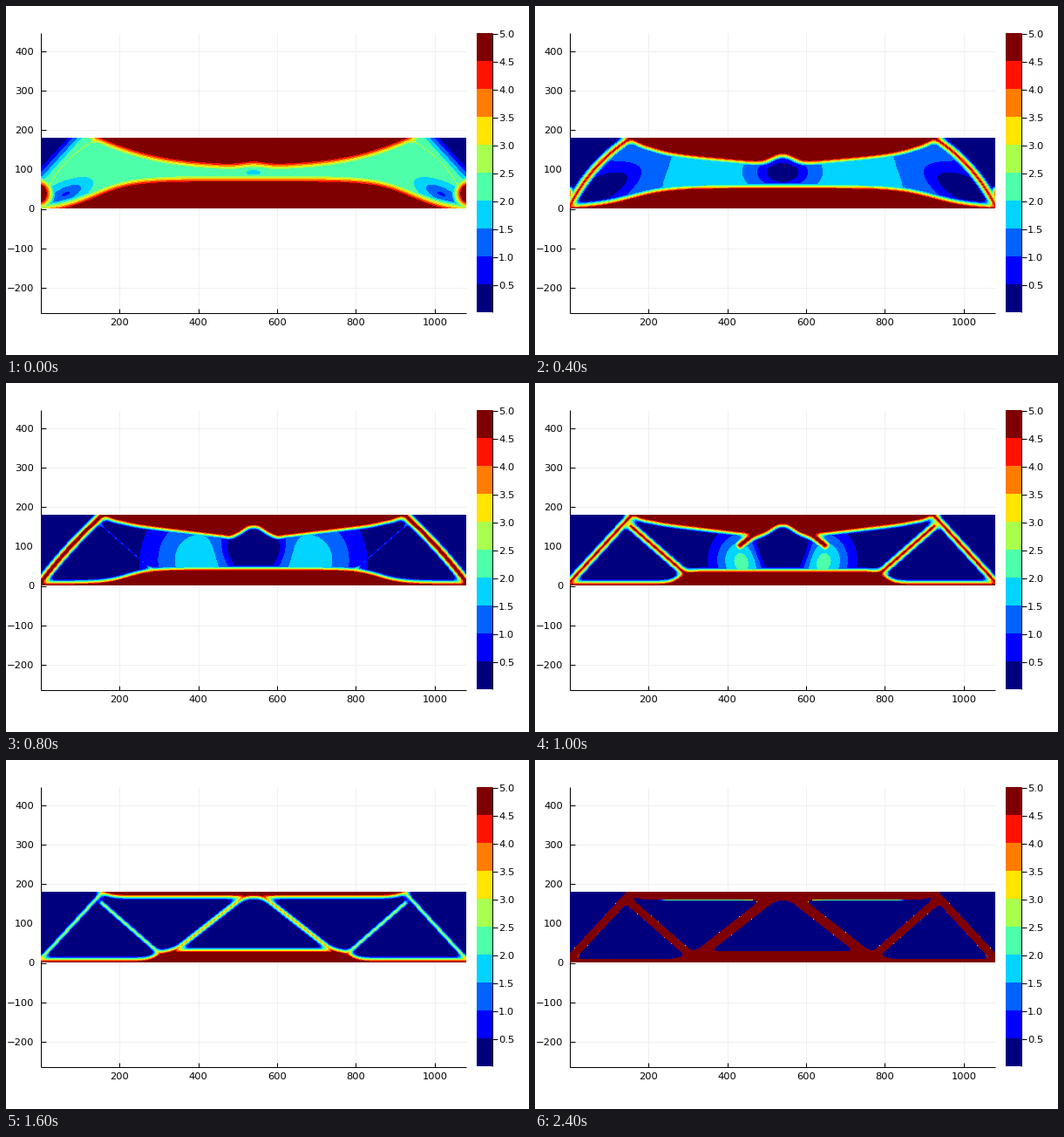
Write a matplotlib script that moves like this. It is 600 px wide and 400 px high and loops after 2.5 s.

```python
import numpy as np
import matplotlib as mpl
import matplotlib.pyplot as plt
from matplotlib.animation import FuncAnimation

W, H, DPI = 600, 400, 100
FRAMES, INTERVAL = 25, 100
LEFT, RIGHT, TOP, BOTTOM = 40, 528, 151, 232
MID = (LEFT + RIGHT) / 2
SCALE = (RIGHT - LEFT) / 1080
FONT = dict(family="DejaVu Sans", fontsize=11.5 * 72 / DPI, color="black")

# Joints of the truss in the left half, in stage pixels
SUPPORT, SHOULDER = (41, 227), (112, 150)
KNEE, FOOT = (110, 164), (180, 225)
CROWN, HEEL = (276, 154), (184, 226)

X, Y = np.meshgrid(np.arange(LEFT, MID) + .5, np.arange(TOP, BOTTOM) + .5)


def ramp(n, times, values):
    return np.interp(n, times, values)


def bell(u, v=0):
    return np.exp(-(u * u + v * v) / 2)


def across(p, q):
    """Position along the line p-q (0 to 1), offset from it, its length."""
    dx, dy = np.subtract(q, p)
    length = np.hypot(dx, dy)
    px, py = X - p[0], Y - p[1]
    return (px * dx + py * dy) / length ** 2, (px * dy - py * dx) / length, length


def strut(p, q, half, bow=0, reach=1):
    """Depth inside a bar from p to q; it may be bowed or partly grown."""
    t, v, length = across(p, q)
    u = np.clip(t, 0, reach)
    return half - np.hypot(v - 4 * bow * u * (1 - u), (t - u) * length)


def chord(edge, rest):
    """Depth behind a curved edge, corrected for its slope."""
    return (edge - rest) / np.hypot(1, np.gradient(edge, axis=1))


def join(a, b, r=6):
    """Union with rounded inner corners."""
    h = np.maximum(r - np.abs(a - b), 0)
    return np.maximum(a, b) + h * h / (4 * r)


def top_chord(n):
    d = MID - X
    flat = ramp(n, [0, 6, 12, 16, 24], [33, 13, 9, 6.5, 9.5])
    swell = ramp(n, [0, 6, 10, 12], [4, 18, 18, 0])
    span = ramp(n, [0, 6], [190, 175])
    edge = flat * (1 - (d / span) ** (3 + n))
    edge += swell * (np.maximum(1 - d / 150, 0) - .85 * bell(d / 12))
    return chord(edge, Y - TOP)


def bottom_chord(n):
    low = ramp(n, [0, 6], [0, 4])
    high = 12 + 25 * np.exp(-n / 7)
    step = ramp(n, [0, 6, 10, 16], [100, 115, 165, 172])
    soft = ramp(n, [6, 10], [22, 5])
    edge = low + (high - low) / (1 + np.exp((step - X) / soft))
    return chord(edge, BOTTOM - Y)


def members(n):
    half = ramp(n, [0, 6, 16, 24], [.6, 5, .5, 4.5])
    bow = ramp(n, [0, 10], [12, 0])
    fade = ramp(n, [6, 10], [12, 0])
    pad = ramp(n, [0, 6], [17, 2]) - np.hypot(X - 36, Y - 215)
    solid = join(top_chord(n), bottom_chord(n))
    solid = join(solid, strut(SUPPORT, SHOULDER, half, bow))
    solid = join(solid, strut(KNEE, FOOT, half - fade))
    if n > 6:
        grown = ramp(n, [6, 15], [0, 1])
        solid = join(solid, strut(CROWN, HEEL, half + 1, reach=grown))
    return np.maximum(solid, pad)


def web(n):
    """Thin material left between the members; it drains into the inner bar."""
    size = 400 * np.exp(-n / 3.6)
    x = ramp(n, [0, 6, 10, 12], [215, 205, 242, 214])
    y = ramp(n, [10, 12], [203, 211])
    level = ramp(n, [0, 6, 10, 12, 14], [2.25, 1.4, 2.4, 2.3, 0])
    level = level * bell((X - x) / size, (Y - y) / size)

    grow = min(n, 2)
    c, s = np.cos(np.radians(25)), np.sin(np.radians(25))
    px, py = X - (69 + 6 * grow), Y - (215 - 4 * grow)
    long = 17 + 6 * grow
    level -= 1.15 * bell((px * c - py * s) / long, (px * s + py * c) / (.38 * long))

    wide = 9 + 6 * grow
    depth = ramp(n, [0, 2, 10], [.35, 1, 3])
    level -= depth * bell((X - MID) / wide, (Y - 191) / (wide * (.33 + .05 * n)))

    v = across(SUPPORT, SHOULDER)[1]
    off, soft = ramp(n, [0, 6], [25, 4]), ramp(n, [0, 6], [17, 5])
    return np.maximum(level, 0) * np.clip(.5 - (v - off) / soft, 0, 1)


def thickness(n):
    steep = ramp(n, [0, 6], [.32, .75]) * 10 ** ramp(n, [16, 24], [0, 2])
    field = np.clip(np.maximum(2.5 + steep * members(n), web(n)), 0, 5)
    return np.hstack([field, field[:, ::-1]])


fig = plt.figure(figsize=(W / DPI, H / DPI), dpi=DPI, facecolor="white")
ax = fig.add_axes([0, 0, 1, 1])
ax.axis("off")


def line(x0, y0, x1, y1, color="black", z=1):
    ax.plot([x0, x1], [y0, y1], color=color, lw=72 / DPI, zorder=z,
            solid_capstyle="butt")


def label(x, y, text, ha):
    ax.text(x, y, text, ha=ha, va="center_baseline", **FONT)


for value in range(200, 1001, 200):
    x = LEFT + value * SCALE
    line(x, 31, x, 352, "#f0f0f0", 0)
    line(x, 352, x, 347)
    label(x, 362.5, str(value), "center")
for value in range(-200, 401, 100):
    y = 232.5 - value * SCALE
    line(LEFT, y, RIGHT, y, "#f0f0f0", 0)
    line(LEFT, y, LEFT + 6, y)
    label(32, y, str(value).replace("-", "\u2212"), "right")
line(LEFT, 31, LEFT, 352)
line(LEFT, 352, RIGHT, 352)

jet = mpl.colormaps["jet"].resampled(10)
style = dict(cmap=jet, vmin=0, vmax=5, aspect="auto", interpolation="nearest",
             zorder=2)
ax.imshow(np.arange(4.75, 0, -.5)[:, None], extent=(540, 558, 351, 31), **style)
line(558, 31, 558, 351, z=3)
for i in range(1, 11):
    y = 351.5 - 32 * i
    line(558, y, 564, y, z=3)
    label(565, y, f"{i / 2:.1f}", "left")

fields = [thickness(n) for n in range(FRAMES)]
beam = ax.imshow(fields[0], extent=(LEFT, RIGHT, BOTTOM, TOP), **style)
ax.set_xlim(0, W)
ax.set_ylim(H, 0)


def update(n):
    beam.set_data(fields[n])
    return [beam]


anim = FuncAnimation(fig, update, frames=FRAMES, interval=INTERVAL,
                     repeat=True, repeat_delay=0)
plt.show()
```
